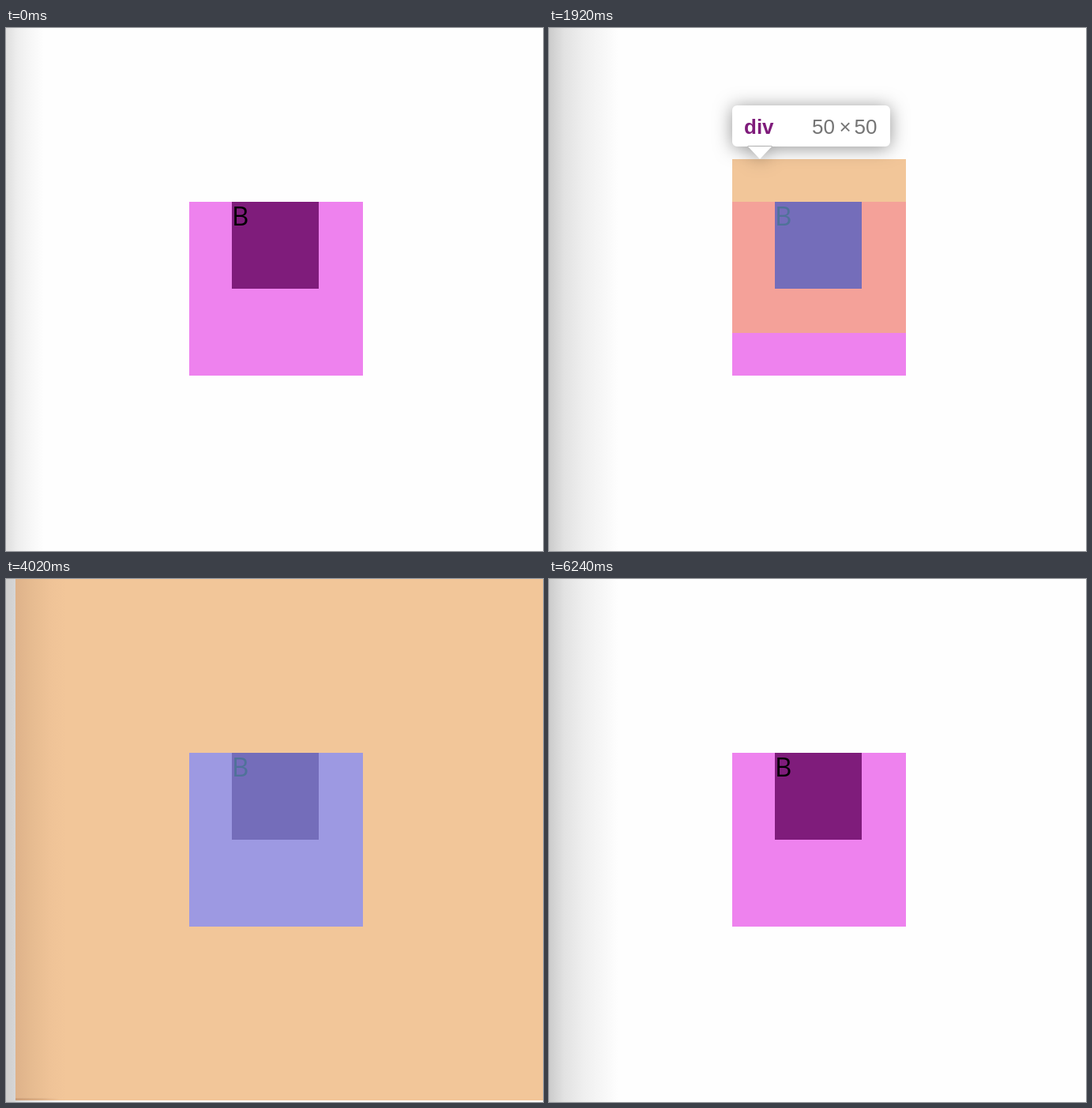
An HTML page with a canvas for the animation above (6450 ms loop, 680 by 662 pixels).

```html
<!DOCTYPE html>
<html lang="en">
<head>
<meta charset="utf-8">
<title>Box highlight</title>
<style>
  html, body { margin: 0; width: 100%; height: 100%; overflow: hidden; background: #fff; }
  canvas { display: block; }
</style>
</head>
<body>
<canvas id="stage" width="680" height="662"></canvas>
<script>
const ctx = document.getElementById('stage').getContext('2d');
const W = 680, H = 662, LOOP = 6450;

// [start time, highlighted element]
const scenes = [
  [0, 'none'], [240, 'body'], [1920, 'div'], [2640, 'body'], [3270, 'div'],
  [4020, 'body'], [4080, 'none'], [4590, 'body'], [4620, 'div'],
  [5670, 'body'], [5730, 'none']
];

// Pointer visits: time span and the four points of a Bezier path
const visits = [
  { from: 4050, to: 4620, path: [[-30, 455], [330, 400], [330, 380], [-44, 450]] },
  { from: 5700, to: 6240, path: [[34, 447], [200, 430], [320, 560], [350, 670]] }
];

function rect(color, x, y, w, h) {
  ctx.fillStyle = color;
  ctx.fillRect(x, y, w, h);
}

function fade(x, y, w, h, stops) {
  const g = ctx.createLinearGradient(x, 0, x + w, 0);
  stops.forEach(([at, color]) => g.addColorStop(at, color));
  rect(g, x, y, w, h);
}

function text(str, x, y, font, color) {
  ctx.font = font;
  ctx.fillStyle = color;
  ctx.fillText(str, x, y);
}

function shadow(color, blur, dy) {
  ctx.shadowColor = color;
  ctx.shadowBlur = blur;
  ctx.shadowOffsetY = dy;
}

function polygon(points) {
  ctx.beginPath();
  points.forEach(([x, y]) => ctx.lineTo(x, y));
  ctx.closePath();
}

function page(narrow) {
  rect('#fefefe', 0, 0, W, H);
  if (narrow) {
    fade(0, 0, 48, H, [[0, '#dedede'], [.3, '#eeeeee'], [.65, '#f7f7f7'], [1, '#fefefe']]);
  } else {
    fade(0, 0, 88, H, [[0, '#cbcbcb'], [.22, '#e2e2e2'], [.5, '#efefef'], [.8, '#f8f8f8'], [1, '#fefefe']]);
  }
}

function boxes(outer, inner, letter) {
  rect(outer, 232, 220, 220, 220);
  rect(inner, 286, 220, 110, 110);
  text('B', 286, 250, '33px "Open Sans", sans-serif', letter);
}

function bodyHighlight() {
  fade(0, 0, 12, H, [[0, '#cecece'], [1, '#d6d6d6']]);
  rect('#f2c699', 12, 0, W - 12, 660);
  fade(12, 0, 64, 660, [[0, '#deb28a'], [.35, '#e7bc91'], [.7, '#efc397'], [1, '#f2c699']]);
  fade(12, 657, 56, 3, [[0, 'rgba(150,100,70,.25)'], [.6, 'rgba(150,100,70,.15)'], [1, 'rgba(150,100,70,0)']]);
  boxes('#9d99e2', '#746dba', '#4f7299');
}

function tooltip() {
  ctx.save();
  shadow('rgba(0,0,0,.42)', 22, 2);
  ctx.fillStyle = '#fff';
  ctx.beginPath();
  ctx.roundRect(232, 98, 200, 52, 6);
  ctx.moveTo(251, 149);
  ctx.lineTo(267, 166);
  ctx.lineTo(283, 149);
  ctx.fill();
  ctx.restore();
  const face = '26px "Liberation Sans", Arial, sans-serif';
  text('div', 247, 134, 'bold ' + face, '#7f1c7b');
  ['50', '×', '50'].forEach((s, i) => text(s, [333, 367.5, 386.5][i], 134, face, '#757575'));
}

function divHighlight() {
  boxes('#ee82ee', '#746dba', '#4f7299');
  rect('#f2c699', 232, 166, 220, 54);
  rect('#f4a199', 232, 220, 54, 166);
  rect('#f4a199', 396, 220, 56, 166);
  rect('#f4a199', 286, 330, 110, 56);
  tooltip();
}

function pointer(x, y) {
  ctx.save();
  ctx.translate(x, y);
  polygon([[3, 8], [3, 52], [14, 41], [23, 63], [28, 60], [19, 40], [35, 40]]);
  ctx.lineWidth = 6;
  ctx.strokeStyle = '#fff';
  shadow('rgba(0,0,0,.4)', 5, 2);
  ctx.stroke();
  shadow('transparent', 0, 0);
  ctx.fillStyle = '#000';
  ctx.fill();
  ctx.restore();
}

function bezier(p, u) {
  const v = 1 - u;
  const k = [v * v * v, 3 * v * v * u, 3 * v * u * u, u * u * u];
  return [0, 1].map(axis => p.reduce((sum, q, i) => sum + k[i] * q[axis], 0));
}

function draw(t) {
  const mode = scenes.filter(s => s[0] <= t).pop()[1];
  page(t < 60);
  if (mode === 'body') bodyHighlight();
  else if (mode === 'div') divHighlight();
  else boxes('#ee82ee', '#7f1c7b', '#000');

  const v = visits.find(v => t >= v.from && t < v.to);
  if (v) {
    const step = Math.floor((t - v.from) / 30) * 30;
    pointer(...bezier(v.path, step / (v.to - v.from)));
  }
}

const start = performance.now();
function tick() {
  draw((performance.now() - start) % LOOP);
  requestAnimationFrame(tick);
}
tick();
</script>
</body>
</html>
```
